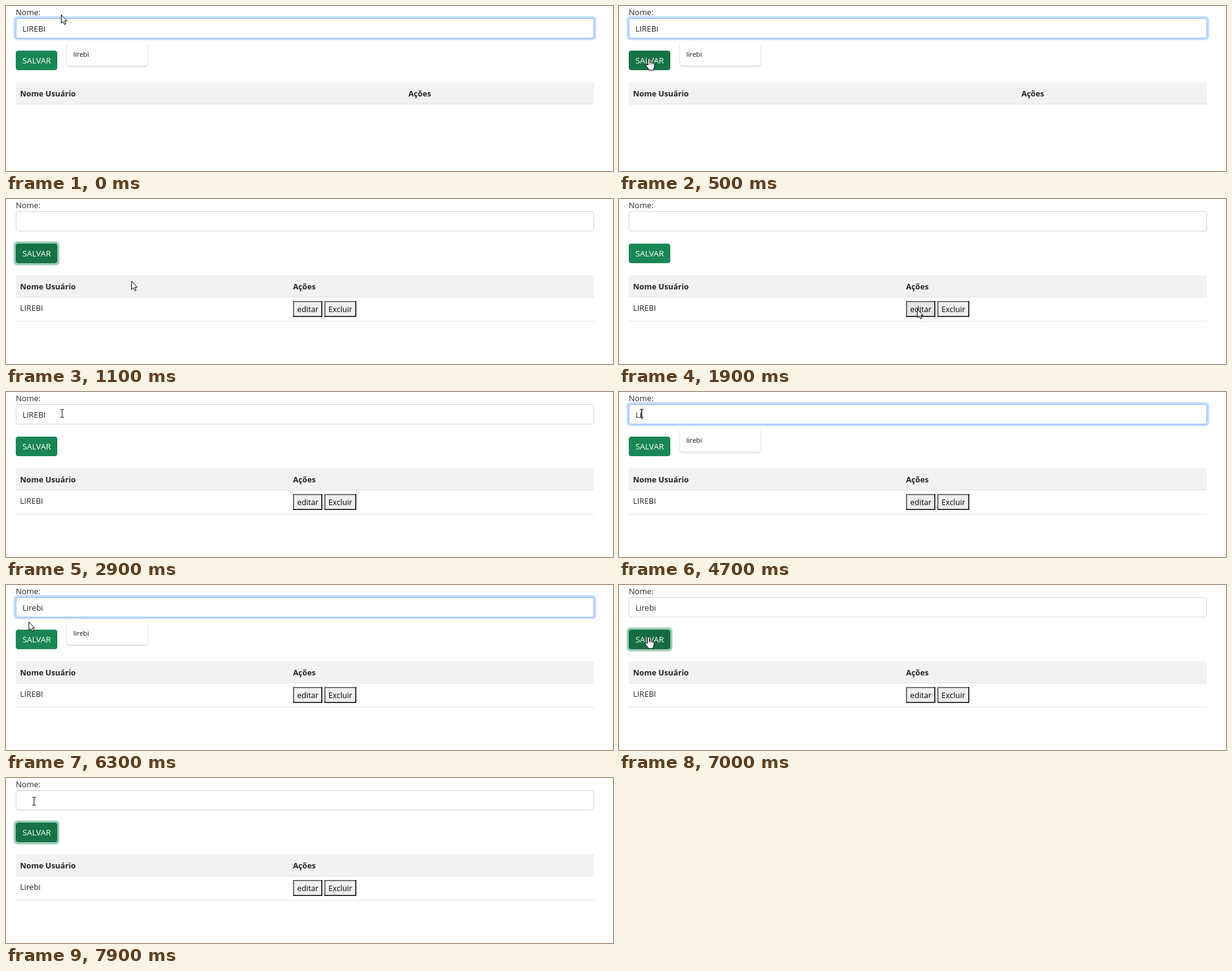
An HTML page that plays this animation: 994x270 px, repeating every 8 s.

```html
<!DOCTYPE html>
<html lang="pt">
<head>
<meta charset="utf-8">
<title>Cadastro</title>
<style>
html, body { margin: 0; width: 100%; height: 100%; overflow: hidden; background: #fff; }
svg { display: block; width: 994px; height: 270px; }
text { font: 13px "Open Sans", "Noto Sans", sans-serif; fill: #212529; white-space: pre; }
.bold { font-size: 12.75px; font-weight: 700; }
.small { font-size: 11px; fill: #111; }
.action { font-size: 12.7px; fill: #000; }
.cursor { fill: #fff; stroke: #000; stroke-linejoin: round; }
</style>
</head>
<body>
<svg viewBox="0 0 994 270">
  <defs>
    <filter id="shadow" x="-10%" y="-20%" width="120%" height="150%">
      <feDropShadow dx="0" dy="1" stdDeviation="1.3" flood-color="#000" flood-opacity=".3"/>
    </filter>
  </defs>

  <text x="16" y="15">Nome:</text>
  <rect id="fieldRing" x="12.5" y="16.8" width="954" height="39" rx="6" fill="#c2dbfe"/>
  <rect id="field" x="16.5" y="20.5" width="946" height="32" rx="3.2" fill="#fff"/>
  <rect id="selection" y="27" height="19" fill="#3390ff"/>
  <text id="value" x="27" y="41.5"><tspan id="plain"></tspan><tspan id="picked" fill="#fff"></tspan></text>
  <rect id="caret" y="27" width="1" height="18" fill="#000"/>

  <rect id="saveRing" x="12.6" y="69.6" width="74.8" height="38.8" rx="6" fill="#9dccb6"/>
  <rect id="save" x="16.5" y="73.5" width="67" height="31" rx="3.2"/>
  <text x="27" y="94.3" style="fill:#fff;font-size:13.3px">SALVAR</text>

  <rect x="16" y="125" width="947" height="35" fill="#f2f2f2"/>
  <rect x="16" y="160" width="947" height="1" fill="#dee2e6"/>
  <text class="bold" x="23" y="148">Nome Usuário</text>
  <text class="bold" id="actions" y="148">Ações</text>

  <g id="row">
    <text id="user" x="23" y="182.5"></text>
    <rect x="16" y="199.5" width="947" height="1" fill="#dee2e6"/>
    <rect id="edit" x="470" y="167" width="48" height="26"/>
    <path d="M470.8 193V167.8H518" fill="none" stroke="#4c4c4c" stroke-width="1.6"/>
    <path d="M470 192.2H517.2V167" fill="none" stroke="#000" stroke-width="1.6"/>
    <text class="action" x="476.8" y="185">editar</text>
    <rect x="521.5" y="167" width="52" height="26" fill="#efefef"/>
    <path d="M522.3 193V167.8H573.5" fill="none" stroke="#4c4c4c" stroke-width="1.6"/>
    <path d="M521.5 192.2H572.7V167" fill="none" stroke="#000" stroke-width="1.6"/>
    <text class="action" x="528" y="185">Excluir</text>
  </g>

  <g id="popup">
    <path d="M104 60H112L117.5 54.5L123 60H228Q232 60 232 64V93.5Q232 97.5 228 97.5H104Q100 97.5 100 93.5V64Q100 60 104 60Z" fill="#fff" filter="url(#shadow)"/>
    <text class="small" id="hint" x="110.3" y="83"></text>
  </g>

  <path id="arrow" class="cursor" d="M.5 .5V14L3.6 11.2L5.8 16.2L8 15.2L5.9 10.4H9.9Z"/>
  <g id="beam" fill="none">
    <path d="M-3 -6.5H-1L0 -5.7L1 -6.5H3M0 -5.7V5.7M-3 6.5H-1L0 5.7L1 6.5H3" stroke="#222" stroke-width="1.1"/>
  </g>
  <g id="hand" class="cursor">
    <path d="M-1.5 .8Q0 -1.2 1.5 .8V6.2Q3.2 5.2 4.3 6.8Q6 5.9 6.9 7.5Q9 7 9.2 9V13Q9 15.5 7.5 17.5V19H-.3V17.5Q-2.4 15 -5 11.2Q-5.8 8.5 -3.3 9.2L-1.5 11Z"/>
    <path d="M1.5 6.2V9.5M4.3 6.8V9.8M6.9 7.5V10" fill="none" stroke-width=".8"/>
  </g>
</svg>
<script>
const LOOP = 8000, STEP = 100;
const NAME = "Lirebi", UPPER = NAME.toUpperCase();
const $ = id => document.getElementById(id);

// Pointer path: time, x, y
const PATH = [
  [0, 90, 14], [100, 86, 27], [300, 66, 66], [500, 49, 86], [800, 49, 86],
  [1000, 140, 118], [1100, 205, 134], [1200, 280, 142], [1400, 400, 168],
  [1600, 446, 175], [1800, 488, 180], [2200, 488, 180], [2400, 400, 160],
  [2700, 150, 62], [2900, 92, 35], [3000, 92, 35], [3300, 37, 35],
  [6200, 37, 35], [6300, 37, 60], [6400, 38, 66], [6800, 48, 85],
  [7300, 48, 85], [7600, 48, 64], [7800, 46, 41], [7900, 46, 38], [8000, 46, 38]
];

// Field content: start time, text
const VALUES = [
  [0, UPPER], [800, ""], [2200, UPPER], [4100, UPPER[0]],
  [4700, NAME.slice(0, 2)], [5000, NAME.slice(0, 3)], [5100, NAME.slice(0, 4)],
  [5400, NAME.slice(0, 5)], [5600, NAME], [7100, ""]
];

const within = (t, a, b) => t >= a && t < b;
const inBox = (p, x0, y0, x1, y1) => p.x >= x0 && p.x <= x1 && p.y >= y0 && p.y <= y1;
const show = (id, on) => $(id).style.display = on ? "" : "none";
const set = (id, attrs) => {
  for (const key in attrs) $(id).setAttribute(key, attrs[key]);
};

function pointerAt(t) {
  const i = PATH.findIndex(p => p[0] > t);
  const [t0, x0, y0] = PATH[i - 1], [t1, x1, y1] = PATH[i];
  const k = (t - t0) / (t1 - t0);
  return { x: x0 + (x1 - x0) * k, y: y0 + (y1 - y0) * k };
}

function drawPointer(p, overSave) {
  const kind = overSave ? "hand" : inBox(p, 16, 20, 963, 53) ? "beam" : "arrow";
  for (const id of ["arrow", "beam", "hand"]) show(id, id === kind);
  set(kind, { transform: `translate(${p.x} ${p.y})` });
}

function drawField(t, p) {
  const focused = t < 700 || within(t, 3000, 7000);
  show("fieldRing", focused);
  set("field", { stroke: focused ? "#86b7fe" : "#ced4da" });
  show("popup", t < 700 || within(t, 3100, 7000));

  const text = VALUES.filter(v => v[0] <= t).pop()[1];
  $("plain").textContent = text;
  $("picked").textContent = "";
  const edge = n => 27 + (n ? $("value").getSubStringLength(0, n) : 0);

  const dragging = within(t, 3100, 4100);
  show("selection", dragging);
  if (dragging) {
    let from = text.length;
    while (from > 1 && edge(from - 1) > p.x - 5) from--;
    const x = edge(from);
    set("selection", { x, width: edge(text.length) - x });
    $("plain").textContent = text.slice(0, from);
    $("picked").textContent = text.slice(from);
  }

  const caretOn = within(t, 3000, 3100) || within(t, 4100, 4400) ||
    within(t, 4700, 6100) || within(t, 6600, 7000);
  show("caret", caretOn);
  if (caretOn) set("caret", { x: Math.round(edge(text.length)) });
}

function drawSave(t, over) {
  const focused = within(t, 700, 1900) || t >= 7000;
  const pressed = within(t, 700, 800) || within(t, 7000, 7100);
  show("saveRing", focused);
  set("save", {
    fill: pressed ? "#146c43" : focused || over ? "#157347" : "#198754",
    stroke: focused || over ? "#146c43" : "#198754"
  });
}

function drawTable(t, p) {
  const filled = t >= 800;
  show("row", filled);
  set("actions", { x: filled ? 470 : 659 });
  $("user").textContent = t >= 7100 ? NAME : UPPER;
  set("edit", { fill: inBox(p, 470, 167, 518, 193) ? "#e5e5e5" : "#efefef" });
}

function draw(now) {
  const t = Math.floor((now % LOOP) / STEP) * STEP;
  const p = pointerAt(t);
  const overSave = inBox(p, 16, 73, 84, 105);
  drawField(t, p);
  drawSave(t, overSave);
  drawTable(t, p);
  drawPointer(p, overSave);
}

$("hint").textContent = NAME.toLowerCase();
let start;
function tick(now) {
  start ??= now;
  draw(now - start);
  requestAnimationFrame(tick);
}
draw(0);
requestAnimationFrame(tick);
</script>
</body>
</html>
```
